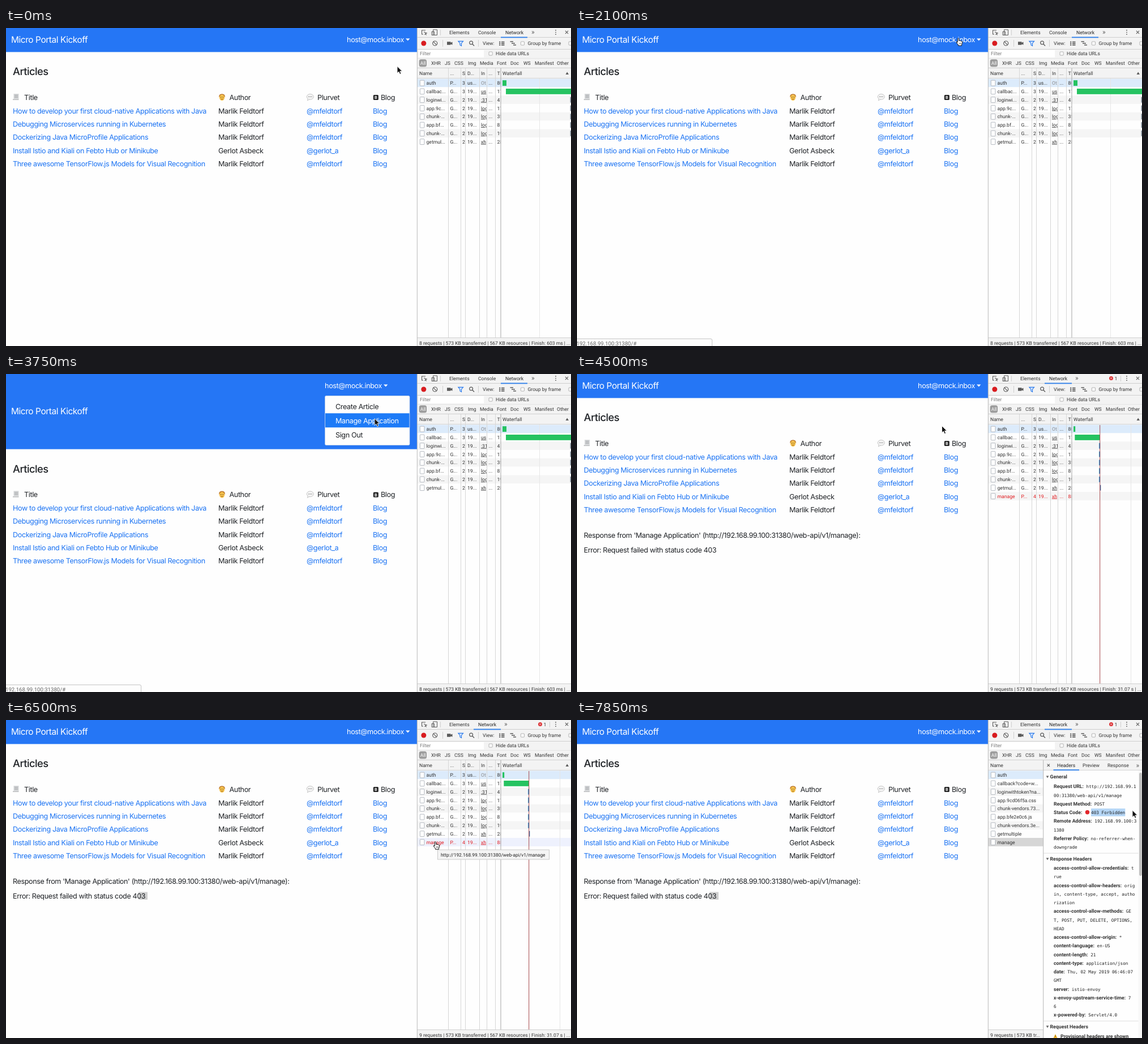
These frames come from a looping animation (998x561 px, 8000 ms). An HTML page:

```html
<!DOCTYPE html>
<html lang="en">
<head>
<meta charset="utf-8">
<title>Articles</title>
<style>
html, body { margin: 0; width: 100%; height: 100%; overflow: hidden; background: #fefefe; }
svg { display: block; }
#stage { width: 998px; height: 561px; }
text { font-family: Inter, Roboto, sans-serif; letter-spacing: -.03em; text-rendering: geometricPrecision; white-space: pre; }
.ui { font-family: Roboto, Inter, sans-serif; letter-spacing: 0; }
.mono { font-family: "DejaVu Sans Mono", monospace; font-size: 7.7px; font-weight: 400; letter-spacing: 0; fill: #222; }
</style>
</head>
<body>
<svg id="stage" viewBox="0 0 998 561"></svg>
<script>
const LOOP = 8000, STEP = 50;
const INK = '#1f2226', LINK = '#1b73f3', NAV = '#2576f5', TOOL = '#f3f3f3', RULE = '#cfcfcf', DIM = '#5a5a5a';
const BODY = 12.6, SMALL = 8.6;

const text = (x, y, s, size = BODY, fill = INK, extra = '') =>
  `<text x="${x}" y="${y}" font-size="${size}" fill="${fill}" ${extra}>${s}</text>`;
const small = (x, y, s, fill = '#333', extra = '') => text(x, y, s, SMALL, fill, `class="ui" ${extra}`);
const rect = (x, y, w, h, fill, extra = '') =>
  `<rect x="${x}" y="${y}" width="${w}" height="${h}" fill="${fill}" ${extra}/>`;
const circle = (x, y, r, fill, extra = '') => `<circle cx="${x}" cy="${y}" r="${r}" fill="${fill}" ${extra}/>`;
const path = (d, fill = 'none', stroke = 'none', width = 1) =>
  `<path d="${d}" fill="${fill}" stroke="${stroke}" stroke-width="${width}"/>`;
const group = (id, inner) => `<g id="${id}">${inner}</g>`;
const cell = (x, y, w, inner) => `<svg x="${x}" y="${y}" width="${w}" height="15">${inner}</svg>`;

// ---- web page ----
const articles = [
  ['How to develop your first cloud-native Applications with Java', 0],
  ['Debugging Microservices running in Kubernetes', 0],
  ['Dockerizing Java MicroProfile Applications', 0],
  ['Install Istio and Kiali on Febto Hub or Minikube', 1],
  ['Three awesome TensorFlow.js Models for Visual Recognition', 0]
];
const authors = [['Marlik Feldtorf', '@mfeldtorf'], ['Gerlot Asbeck', '@gerlot_a']];

function headings() {
  const page = rect(13.5, 116, 9, 9, '#d4d6d8') + path('M12 125.5H22.5V127H12Z', '#b4b6b8') +
    path('M15 118.5H21M15 120.5H21M15 122.5H21', 'none', '#9a9da0', .7);
  const face = path('M376.3 122Q375.6 116.4 381.5 116.2Q387.4 116.4 386.7 122Z', '#b9742a') +
    '<ellipse cx="381.5" cy="122.8" rx="4.6" ry="5.2" fill="#f6c34e"/>' +
    circle(379.8, 122, .7, '#4a2c12') + circle(383.2, 122, .7, '#4a2c12') +
    path('M379.5 125Q381.5 126.6 383.5 125', 'none', '#7a4315', .8);
  const bubble = '<ellipse cx="537.3" cy="121.3" rx="6" ry="4.8" fill="#f6f6f6" stroke="#b5b5b5" stroke-width=".8"/>' +
    path('M533 124.5L532.3 128L536 126', '#f6f6f6', '#b5b5b5', .7) +
    [534.7, 537.3, 539.9].map(x => circle(x, 121.3, .8, '#777')).join('');
  const badge = rect(648.8, 118, 9, 9, '#222', 'rx="1.5"') +
    text(653.3, 125.2, 'B', 7, '#fff', 'font-weight="700" text-anchor="middle"');
  return page + face + bubble + badge + text(32, 127, 'Title') + text(394.5, 127, 'Author') +
    text(550, 127, 'Plurvet') + text(662, 127, 'Blog');
}

const content = text(12, 83.4, 'Articles', 18.3, INK, 'font-weight="500"') + headings() +
  articles.map(([title, who], i) => {
    const y = 150.6 + i * 23.33, [name, handle] = authors[who];
    return text(12, y, title, BODY, LINK) + text(375, y, name) +
      text(531, y, handle, BODY, LINK) + text(648, y, 'Blog', BODY, LINK);
  }).join('');

const response = rect(234, 303.5, 16, 13.5, '#b5d6fd', 'id="pick"') +
  text(12, 288.6, "Response from 'Manage Application' (http://192.168.99.100:31380/web-api/v1/manage):") +
  text(12, 314.8, 'Error: Request failed with status code 403');

const account = text(703, 25, 'host@mock.inbox', BODY, '#fff', 'text-anchor="end"') +
  path('M706 18.6H713.4L709.7 22.4Z', '#fff');

const menu = rect(563.5, 38.5, 149.5, 87, '#fefefe', 'rx="2" stroke="#c9d3e2" stroke-width=".6"') +
  rect(564, 69.3, 148.5, 25, '#1d7bf7', 'id="pressed"') + text(582, 61.8, 'Create Article') +
  text(582, 86.8, 'Manage Application', BODY, INK, 'id="manage"') + text(582, 111.8, 'Sign Out');

const status = path('M-1 562V548.3H236Q238.7 548.3 238.7 551V562Z', '#fdfdfd', '#c4c4c4') +
  text(-1, 560, '192.168.99.100:31380/#', 9.6, '#666', 'class="ui"');

// ---- developer tools ----
const checkbox = (x, y) => rect(x - 3, y - 3, 6.2, 6.2, '#fafafa', 'rx="1" stroke="#999" stroke-width=".7"');
const vline = (x, y1, y2, color = RULE) => path(`M${x} ${y1}V${y2}`, 'none', color);
const hline = (y, x1 = 726, x2 = 998, color = RULE) => path(`M${x1} ${y}H${x2}`, 'none', color);
const close = (x, y, r = 2.6) => path(`M${x - r} ${y - r}l${2 * r} ${2 * r}m0 ${-2 * r}l${-2 * r} ${2 * r}`, 'none', DIM, 1.1);

function toolbar() {
  const filters = { XHR: 751, JS: 775, CSS: 792, Img: 816, Media: 837, Font: 867, Doc: 891, WS: 914, Manifest: 934, Other: 973 };
  return rect(726, 0, 272, 561, TOOL) + hline(16.5) + hline(37.5) + hline(53.5, 726, 998, '#e4e4e4') + hline(70.5) +
    path('M741 4H734.5V11H737M738 7L743 9L740.7 9.9L742.6 12.3M740.7 9.9L739.6 12Z', 'none', DIM, 1.1) +
    path('M754.5 3H761.5V12.5H754.5ZM752 6.5H756.5V12.5H752Z', TOOL, DIM, 1) + vline(767.5, 3, 13) +
    small(783, 10.6, 'Elements') + circle(971, 4, .9, DIM) + circle(971, 7.6, .9, DIM) + circle(971, 11.2, .9, DIM) + close(990.5, 7.5) +
    circle(737.8, 27, 4.5, '#d81c20') + circle(757.7, 27, 4, 'none', `stroke="${DIM}" stroke-width="1.2"`) +
    path('M755 24.2L760.5 29.8', 'none', DIM, 1.2) + vline(771.5, 21, 33) +
    path('M779 24.3H785.5V26L788.5 24.5V29.7L785.5 28.2V29.8H779Z', DIM) +
    path('M798.8 23.4H807.6L804.5 27V31.5L801.9 30V27Z', '#dbe9ff', '#2677ea', 1.1) +
    circle(821.6, 26, 2.9, 'none', `stroke="${DIM}" stroke-width="1.2"`) + path('M823.7 28.2L827 31.5', 'none', DIM, 1.4) +
    vline(834.5, 21, 33) + small(842, 30, 'View:') +
    path('M871 24.5H873.5M875 24.5H880.5M871 27.2H873.5M875 27.2H880.5M871 29.8H873.5M875 29.8H880.5', 'none', DIM, 1.7) +
    path('M890.5 24H896M893 27H899M896 30H901', 'none', DIM, 1.5) + checkbox(912.3, 27) +
    small(921.5, 30, 'Group by frame') + checkbox(997, 27) +
    rect(729, 39, 115, 13, '#fff') + small(731, 48.2, 'Filter', '#777') + checkbox(856, 45) + small(865, 48, 'Hide data URLs') +
    rect(729.7, 55.3, 13.3, 13.3, '#9c9c9c', 'rx="3.5"') + small(731.8, 65, 'All', '#fff') +
    Object.entries(filters).map(([s, x]) => small(x, 65, s)).join('');
}

const tabs = failed => failed
  ? small(834, 10.6, 'Network', '#222') + rect(826, 15.6, 48, 1.8, '#2b7de9') + text(880, 11, '»', 12, DIM, 'class="ui"') +
    circle(943.5, 7.5, 3.5, '#dc3437') + path('M942.2 6.2l2.6 2.6m0-2.6l-2.6 2.6', 'none', '#fff', .8) +
    small(949.5, 10.7, '1') + vline(960.5, 3, 13)
  : small(834, 10.6, 'Console') + small(882, 10.6, 'Network', '#222') + rect(874, 15.6, 47, 1.8, '#2b7de9') +
    text(928, 11, '»', 12, DIM, 'class="ui"');

const requests = [
  ['auth', 'auth', 'P...', 3, 'us...', 'Ot', '80'],
  ['callbac...', 'callback?code=w...', 'G...', 3, '19...', 'us', '17'],
  ['loginwi...', 'loginwithtoken?na...', 'G...', 2, '19...', ':31', '4'],
  ['app.9c...', 'app.9cd06f5a.css', 'G...', 2, '19...', 'log', '17'],
  ['chunk-...', 'chunk-vendors.73...', 'G...', 2, '19...', 'log', '35'],
  ['app.bf...', 'app.bfe2e0c6.js', 'G...', 2, '19...', 'log', '8'],
  ['chunk-...', 'chunk-vendors.3e...', 'G...', 2, '19...', 'log', '19'],
  ['getmul...', 'getmultiple', 'G...', 2, '19...', 'xh', '28'],
  ['manage', 'manage', 'P...', 4, '19...', 'xh', '88']
];
const rowTop = i => 89.6 + i * 14.8;
const rowFill = i => i === 0 ? '#dcebfb' : i % 2 ? '#fefefe' : '#f5f5f5';
const fileIcon = i => rect(731.3, rowTop(i) + 2.6, 7.6, 9.8, '#fff', 'rx=".8" stroke="#a3a9b2" stroke-width=".8"');
const bar = (i, x, w, fill) => rect(x, rowTop(i) + 2.6, w, 9.8, fill);
const footer = s => rect(726, 546, 272, 15, TOOL) + hline(546.5) + small(730, 559, s);

function network(failed) {
  const columns = [742.5, 784.5, 806, 815, 839, 852.5, 867.5];
  const ends = [781, 803, 811, 836, 849, 864, 873.5];
  const heads = ['Name', '...', 'S', 'D...', 'In', '...', 'T'];
  const rows = requests.slice(0, failed ? 9 : 8).map(([name, , method, code, domain, from, size], i) => {
    const color = i === 8 ? '#e0191d' : '#303030', y = rowTop(i);
    const values = [name, method, code, domain, from, '...', size];
    return rect(726, y, 272, 14.8, rowFill(i), i === 8 ? 'id="hover"' : '') + fileIcon(i) +
      values.map((v, c) => cell(columns[c], y, ends[c] - columns[c],
        small(0, 10.5, v, c === 4 && !i ? '#888' : color, c === 4 && i ? 'text-decoration="underline"' : ''))).join('');
  }).join('');
  const bars = failed
    ? bar(0, 877, 3.2, '#25c361') + bar(1, 879.3, 44.7, '#25c361') + bar(7, 924, 1.3, '#39649e')
    : bar(0, 877, 7, '#25c361') + bar(1, 883, 115, '#25c361');
  const ticks = [2, 3, 4, 5, 6].map(i => failed ? bar(i, 922, 2.2, '#2a93d5') : bar(i, 996.6, 1.4, '#7d8b98')).join('');
  return tabs(failed) + rect(726, 89, 272, 457, '#fefefe') + rows + hline(88.7) +
    heads.map((h, c) => cell(c ? columns[c] : 730, 72.5, ends[c] - columns[c] + (c ? 0 : 12), small(0, 10.5, h))).join('') +
    small(877, 83, 'Waterfall') + path('M988.5 82H994L991.2 77.5Z', DIM) +
    ends.map((x, i) => vline(i === 6 ? 874 : x + .5, 71, 546, i === 6 ? '#a5a5a5' : '#d6d6d6')).join('') +
    vline(failed ? 978.5 : 942.5, 89, 546, '#e6e6e6') + bars + ticks +
    (failed ? vline(923.7, 90, 546, '#a5484a') : '') +
    footer(`${failed ? 9 : 8} requests | 573 KB transferred | 567 KB resources | Finish: ${failed ? '31.07 s' : '603 ms'} | ...`);
}

const tooltip = rect(762.5, 229, 197, 17, '#f4f4f4', 'stroke="#bdbdbd" stroke-width=".8"') +
  text(768, 241, 'http://192.168.99.100:31380/web-api/v1/manage', 8.35, '#222', 'class="ui"');

const general = [
  ['Request URL:', 'http://192.168.99.1'], ['', '00:31380/web-api/v1/manage'], ['Request Method:', 'POST'],
  ['Status Code:', ''], ['Remote Address:', '192.168.99.100:3'], ['', '1380'],
  ['Referrer Policy:', 'no-referrer-when-'], ['', 'downgrade']
];
const replies = [
  ['access-control-allow-credentials:', 't'], ['', 'rue'], ['access-control-allow-headers:', 'orig'],
  ['', 'in, content-type, accept, autho'], ['', 'rization'], ['access-control-allow-methods:', 'GE'],
  ['', 'T, POST, PUT, DELETE, OPTIONS,'], ['', 'HEAD'], ['access-control-allow-origin:', '*'],
  ['content-language:', 'en-US'], ['content-length:', '21'], ['content-type:', 'application/json'],
  ['date:', 'Thu, 02 May 2019 06:46:07'], ['', 'GMT'], ['server:', 'istio-envoy'],
  ['x-envoy-upstream-service-time:', '7'], ['', '6'], ['x-powered-by:', 'Servlet/4.0']
];
const bold = (x, y, s) => text(x, y, s, 8.75, '#333', 'class="ui" font-weight="700"');
const fields = (list, top) => list.map(([label, value], i) => bold(842, top + i * 15.25,
  label + `<tspan class="mono" dx="${label ? 4.5 : 0}">${value}</tspan>`)).join('');
const section = (y, s) => path(`M828.6 ${y - 4.7}H833.4L831 ${y - .8}Z`, '#666') + bold(835.5, y, s);

const panel = tabs(true) + rect(726, 89, 272, 472, '#fefefe') + hline(88.7) + small(730, 83, 'Name') +
  requests.map(([, name], i) => rect(726, rowTop(i), 97.5, 14.8, rowFill(i), i === 8 ? 'id="chosen"' : '') + fileIcon(i) +
    small(742.5, rowTop(i) + 10.5, name, '#303030', i === 8 ? 'id="chosenName"' : '')).join('') +
  footer('9 requests | 573 KB tr...') + rect(824, 89.2, 174, 472, '#fefefe') + vline(823.7, 71, 561, '#b5b5b5') +
  close(832.8, 79.8, 2.2) + small(848, 83, 'Headers', '#222') + rect(841.5, 87.3, 45.5, 1.8, '#2b7de9') +
  small(893, 83, 'Preview') + small(937, 83, 'Response') + text(987.5, 84, '»', 12, DIM, 'class="ui"') +
  section(103.3, 'General') + rect(908, 156.2, 0, 13.6, '#b5d6f6', 'id="drag"') + fields(general, 120.3) +
  circle(901.5, 162.7, 3.7, '#e2262b') + '<text class="mono" x="908" y="165.8">403 Forbidden</text>' +
  hline(235, 824, 992, '#dedede') + section(248, 'Response Headers') + fields(replies, 264.2) +
  hline(531, 824, 992, '#dedede') + section(544, 'Request Headers') +
  path('M841.5 561L845 554L848.5 561Z', '#f2b62c') + path('M845 556.5V559', 'none', '#54400c', .9) +
  bold(854, 561, 'Provisional headers are shown') +
  rect(991.5, 89.2, 6.5, 472, '#f8f8f8') + rect(993, 93, 4.8, 182, '#c1c1c1', 'rx="2.4"');

// ---- pointer ----
const pointers = {
  arrow: path('M0 0V12.2L2.8 9.6L4.8 14L7 13L5 8.8H8.8Z', '#111', '#fff', .9),
  hand: path('M-1.2 6.5V1.2Q0 -.8 1.2 1.2V5Q2.5 4 3.5 5.3Q4.8 4.6 5.6 5.9Q7.3 5.6 7.2 7.5Q7.3 10.5 5.9 12V13.6H-.1V12.2Q-1.8 10.5 -3.4 7.6Q-3.2 5.8 -1.2 7.8Z', '#fff', '#111', 1) +
    path('M1.6 8.5V11M3.4 8.5V11M5 8.5V11', 'none', '#333', .7),
  beam: path('M-2.5 -6Q0 -6 0 -4.5Q0 -6 2.5 -6M0 -4.5V4.5M-2.5 6Q0 6 0 4.5Q0 6 2.5 6M-1.3 1.8H1.3', 'none', '#222', 1)
};
const track = [
  [0, 691, 67.5, 'arrow'], [700, 691, 67.5, 'arrow'], [1550, 597, 18.5, 'arrow'], [1600, 610, 18, 'hand'],
  [2100, 673.5, 17.5, 'hand'], [2800, 673.5, 17.5, 'hand'], [2950, 653.5, 49.5, 'hand'], [3450, 652, 79, 'hand'],
  [3750, 651, 78.5, 'arrow'], [4450, 651, 78.5, 'arrow'], [4500, 644.5, 91.5, 'arrow'], [4950, 248, 299, 'beam'],
  [5000, 239, 304, 'beam'], [5100, 239, 304, 'beam'], [5400, 234, 308, 'beam'], [5500, 234, 308, 'beam'],
  [5650, 296, 309, 'arrow'], [5750, 296, 309, 'arrow'], [6200, 752, 219, 'hand'], [6250, 758.5, 214.5, 'hand'],
  [7000, 758.5, 214.5, 'hand'], [7050, 766, 212, 'arrow'], [7300, 914, 166, 'beam'], [7400, 909, 163.5, 'beam'],
  [7650, 909, 163.5, 'beam'], [7850, 981, 159.3, 'arrow'], [LOOP, 981, 159.3, 'arrow']
];

function pointerAt(t) {
  const i = track.findIndex((k, n) => n + 1 === track.length - 1 || t < track[n + 1][0]);
  const [t0, x0, y0, kind] = track[i], [t1, x1, y1] = track[i + 1];
  const p = (t - t0) / (t1 - t0), e = p * p * (3 - 2 * p);
  return { x: x0 + (x1 - x0) * e, y: y0 + (y1 - y0) * e, kind };
}

// ---- scene ----
document.getElementById('stage').innerHTML =
  rect(0, 0, 998, 561, '#fefefe') + rect(0, 0, 726, 42, NAV, 'id="nav"') +
  group('brand', text(9, 25.7, 'Micro Portal Kickoff', 15.5, '#fff')) + group('account', account) +
  group('content', content) + group('response', response) + group('menu', menu) + group('status', status) +
  toolbar() + group('before', network(false)) + group('after', network(true)) + group('panel', panel) +
  vline(726.3, 0, 561, '#b9b9b9') + group('tip', tooltip) +
  group('pointer', Object.entries(pointers).map(([id, shape]) => group(id, shape)).join(''));

const el = id => document.getElementById(id);
const show = (id, on) => el(id).style.display = on ? '' : 'none';
const move = (id, x, y) => el(id).setAttribute('transform', `translate(${x} ${y})`);
const set = (id, name, value) => el(id).setAttribute(name, value);
const during = (t, a, b = LOOP) => t >= a && t < b;

function render(t) {
  const open = during(t, 2500, 3850), pressed = during(t, 3750, 3850);
  const replied = t >= 4000, detail = t >= 6550;
  set('nav', 'height', open ? 132.6 : 42.4);
  move('brand', 0, open ? 45.3 : 0);
  move('account', open ? -39 : 0, 0);
  move('content', 0, open ? 90.4 : 0);
  show('menu', open);
  show('pressed', pressed);
  set('manage', 'fill', pressed ? '#fff' : INK);
  show('status', during(t, 1600, 4000));
  show('response', replied);
  show('pick', t >= 5600);
  set('pick', 'fill', t >= 6500 ? '#cfcfcf' : '#b5d6fd');
  show('before', !replied);
  show('after', replied && !detail);
  set('hover', 'fill', t >= 6200 ? '#eef1fd' : rowFill(8));
  show('tip', during(t, 6250, 6550));
  show('panel', detail);
  set('chosen', 'fill', t >= 7700 ? '#d6d6d6' : '#1a73e8');
  set('chosenName', 'fill', t >= 7700 ? '#303030' : '#fff');

  const { x, y, kind } = pointerAt(t);
  set('drag', 'width', t >= 7700 ? Math.max(0, Math.min(60.3, x - 908)) : 0);
  move('pointer', x, y);
  Object.keys(pointers).forEach(id => show(id, id === kind));
}

function frame() {
  const t = performance.now() % LOOP;
  render(Math.floor(t / STEP) * STEP);
  requestAnimationFrame(frame);
}
frame();
</script>
</body>
</html>
```
